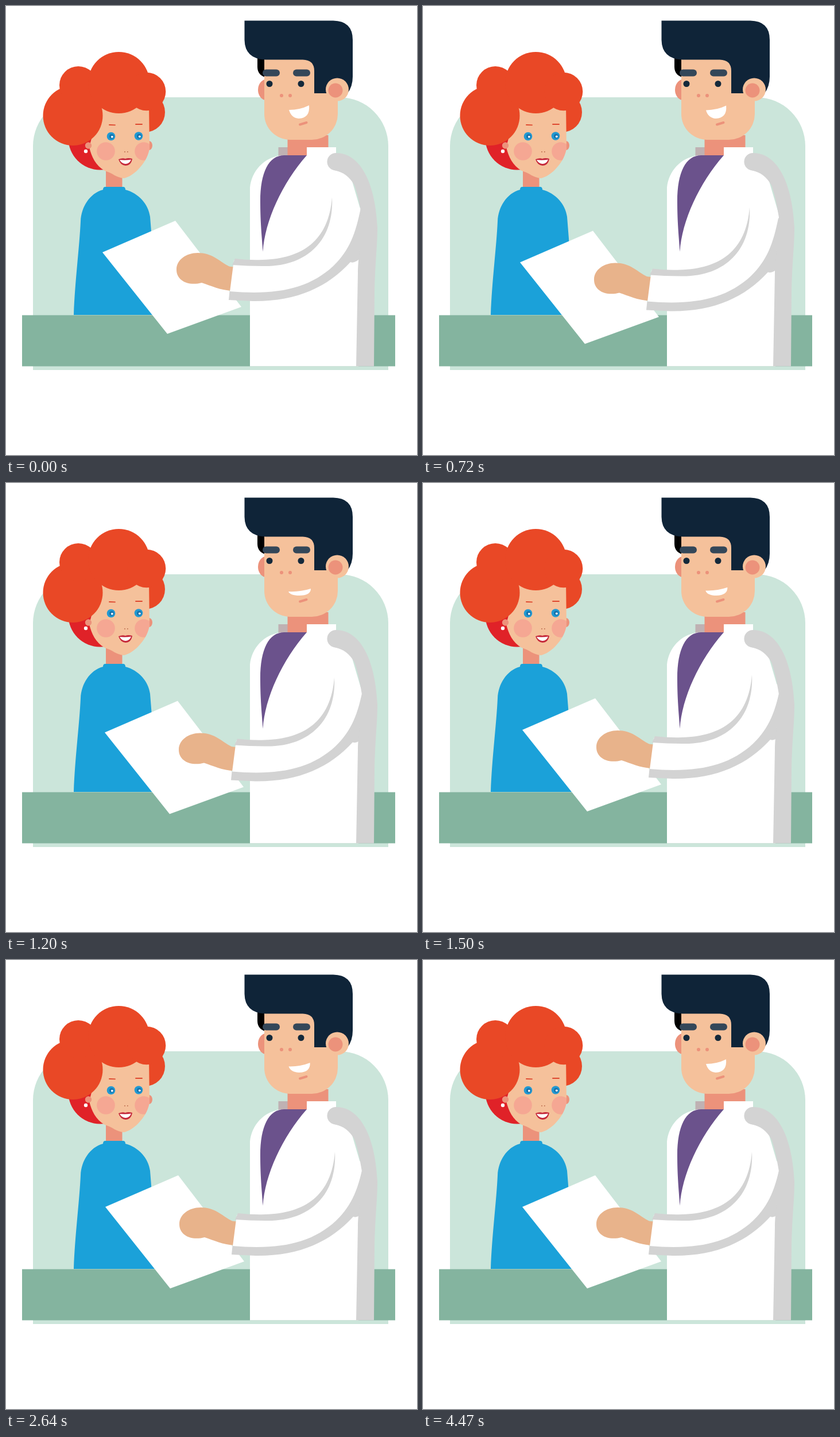
Animation of 716x782 px, one loop 4.5 s. Source, as an HTML page with a canvas:

```html
<!DOCTYPE html>
<html lang="en">
<head>
<meta charset="utf-8">
<title>Consultation</title>
<style>
  html, body { margin: 0; width: 100%; height: 100%; overflow: hidden; background: #fff; }
  canvas { display: block; }
</style>
</head>
<body>
<canvas id="stage" width="716" height="782"></canvas>
<script>
const ctx = document.getElementById('stage').getContext('2d');
const LOOP = 4500, STEP = 30;
const SKIN = '#f5c19b', SALMON = '#ec927b', ORANGE = '#e94826', NAVY = '#0f2438';
const MINT = '#cbe5da', GREY = '#d3d3d3', WHITE = '#fff';

function shape(color, d) {
  ctx.fillStyle = color;
  ctx.fill(new Path2D(d));
}
function rect(color, x, y, w, h, r = 0) {
  ctx.fillStyle = color;
  ctx.beginPath();
  ctx.roundRect(x, y, w, h, r);
  ctx.fill();
}
function dot(color, x, y, r, ry = r) {
  ctx.fillStyle = color;
  ctx.beginPath();
  ctx.ellipse(x, y, r, ry, 0, 0, Math.PI * 2);
  ctx.fill();
}
function line(color, width, x1, y1, x2, y2) {
  ctx.strokeStyle = color;
  ctx.lineWidth = width;
  ctx.lineCap = 'round';
  ctx.beginPath();
  ctx.moveTo(x1, y1);
  ctx.lineTo(x2, y2);
  ctx.stroke();
}
const mix = (a, b, k) => a + (b - a) * k;

// Linear interpolation through [time, value] pairs.
function track(keys, t) {
  const i = keys.findIndex(key => key[0] > t);
  if (i < 0) return keys[keys.length - 1][1];
  if (i === 0) return keys[0][1];
  const [t0, v0] = keys[i - 1], [t1, v1] = keys[i];
  return mix(v0, v1, (t - t0) / (t1 - t0));
}

const armX = [[0, 0], [300, 1], [740, 1], [1080, 3], [1200, 4], [1400, 5]];
const armY = [[0, 0], [360, 9.5], [540, 14], [720, 17.5], [765, 18], [810, 17.2],
  [1080, 9.2], [1200, 5.5], [1320, 2], [1410, 1]];
// 0 = wide smile, 1 = narrow smile
const smile = [[0, 0], [540, 0], [720, 0.05], [1080, 0.5], [1200, 1], [1440, 0.95],
  [1620, 0.5], [1740, 0.1], [2010, 1], [2160, 0.9], [2700, 0.5], [3240, 0.36],
  [3360, 0.3], [3780, 0.16], [4320, 0.03], [4470, 0]];
const blinks = [200, 1830];

function eyeOpen(t) {
  const gap = Math.min(...blinks.map(b => Math.abs(t - b)));
  return Math.max(0.1, Math.min(1, gap / 90));
}

function womanEye(x, y, open) {
  ctx.save();
  ctx.translate(x, y);
  ctx.scale(1, open);
  dot('#2299d1', 0, 0, 7.3);
  dot('#1672ac', 1, 0.3, 4);
  dot(WHITE, 1.8, 0.8, 1.9);
  ctx.restore();
}

function woman(open) {
  dot('#e02228', 164, 230, 55.5);
  dot(ORANGE, 242, 185, 35);
  rect(SALMON, 174, 280, 28.5, 42);
  shape('#1ba1d9', `M173 315 H204 Q208 315 208 320 C231 326 248 345 251 367
    L254 405 L262 538 H118 C120 480 128 420 130 375 C131 350 146 326 169 320 Q169 315 173 315 Z`);
  dot(SALMON, 249, 243, 6, 8);
  const face = new Path2D(`M146 242 L165 170 H249 L250 248 C247 265 239 275 230 285
    C222 293 212 299 205 300 C192 299 186 291 172 287 C156 278 149 262 145 246 Z`);
  ctx.fillStyle = SKIN;
  ctx.fill(face);
  ctx.save();
  ctx.clip(face);
  dot('#f5a793', 240, 253, 15.8);
  ctx.restore();
  dot('#f5a793', 174, 253, 15.8);
  dot(ORANGE, 116.5, 191, 52);
  dot(ORANGE, 126, 138, 33);
  dot(ORANGE, 196.5, 133.5, 53.5);
  dot(ORANGE, 245, 149, 33.3);
  dot(SALMON, 143.5, 243, 5.7);
  dot(WHITE, 139, 253, 3.2);
  line('#de482f', 1.8, 180, 207, 190, 207.3);
  line('#de482f', 1.8, 226, 206, 237, 206);
  womanEye(183, 227, open);
  womanEye(231, 226.5, open);
  dot('#bd6e50', 207, 254, 1);
  dot('#bd6e50', 211.8, 254, 1);
  shape('#c5283a', 'M196 267 Q203 264 208 266 Q213 264 220 266 Q218 278 208 278 Q199 277 196 267 Z');
  shape(WHITE, 'M198 268 Q208 269 218 267.5 Q215 275 208 275 Q201 274 198 268 Z');
}

function mouth(k) {
  const m = (a, b) => mix(a, b, k);
  shape(WHITE, `M${m(493, 492)} ${m(181, 189)}
    Q512 ${m(181, 190)} ${m(528, 531)} ${m(173, 184)}
    Q${m(530, 531)} ${m(195, 196)} ${m(510, 511)} 196
    Q${m(497, 495)} ${m(195, 196)} ${m(493, 492)} ${m(181, 189)} Z`);
}

function manHead(k) {
  shape('#000', 'M438 88 H456 V125 Q438 122 438 106 Z');
  dot(SALMON, 454, 146, 15, 18.5);
  rect(SKIN, 450, 85, 128, 148, [0, 0, 45, 45]);
  shape(NAVY, `M415.500 25.500 H570 Q604 26 604 59 V123 Q604 140 595 152 H537
    V113 Q537 94 517 93.500 H452 Q416 92 415.500 59 Z`);
  dot(SKIN, 577, 145.5, 20);
  dot(SALMON, 574, 147, 12.5);
  for (const x of [447, 500]) rect('#344759', x, 110.5, 30, 12, 6);
  for (const x of [459, 514]) dot('#14293b', x, 135.5, 5.5);
  for (const x of [480, 495]) dot(SALMON, x, 156, 3);
  mouth(k);
  line(SALMON, 4, 512, 206.5, 523.5, 203);
}

function coat() {
  rect('#bfb1b3', 474.5, 246, 17, 16);
  rect(SALMON, 490.5, 225, 71, 36);
  shape(WHITE, `M425 627.500 V316 C428 288 448 264 480 260 H524 V246 H575 V258
    L600 295 L622 370 L614 627.500 Z`);
  shape('#6b528c', `M524 260 H486 C458 259 443 289 443 340 C443 380 446 403 447.500 428
    C451 374 481 309 524 260 Z`);
}

function arm(dx, dy) {
  ctx.save();
  ctx.translate(dx, dy);
  shape(WHITE, 'M168 429 L295 374 L410 524 L281 571 Z');
  shape('#e8b38b', `M297 459 C297 442 314 430 334 430 C359 430 371 444 386 452
    Q390 455 400 454 L394 496 C372 495 357 487 341 482 C318 488 297 479 297 459 Z`);
  shape(WHITE, `M397 443 L389 505 C470 510 540 500 575 460 C602 428 609 395 618 352
    L568 333 C562 420 515 446 447 446 Z`);
  shape(GREY, `M399 440 Q425 443 447 442 C515 440 562 410 568 333
    C572 408 524 455 447 453 Q420 453 394 451 Z`);
  shape(GREY, `M389.500 497 C470 504 527 493 570 453 C599 425 609 396 618 352
    H630 L618 438 Q608 449 600 446 C560 490 505 515 430 514 L388 512 Z`);
  ctx.restore();
}

function coatShade() {
  shape(GREY, `M575 256 C616 256 643 305 647 385 C647 420 643 445 642 500 L641 627.500
    H610 L613 465 C613 440 620 400 620 368 C617 350 614 332 607 312
    Q594 290 573 286.500 A15.300 15.300 0 0 1 575 256 Z`);
}

function draw(t) {
  rect(WHITE, 0, 0, 716, 782);
  rect(MINT, 47, 159, 619, 475, [85, 85, 0, 0]);
  woman(eyeOpen(t));
  rect('#84b49f', 28, 538.5, 650, 89);
  coat();
  manHead(track(smile, t));
  arm(track(armX, t), track(armY, t));
  coatShade();
}

const start = performance.now();
function frame() {
  const t = (performance.now() - start) % LOOP;
  draw(Math.floor(t / STEP) * STEP);
  requestAnimationFrame(frame);
}
frame();
</script>
</body>
</html>
```
